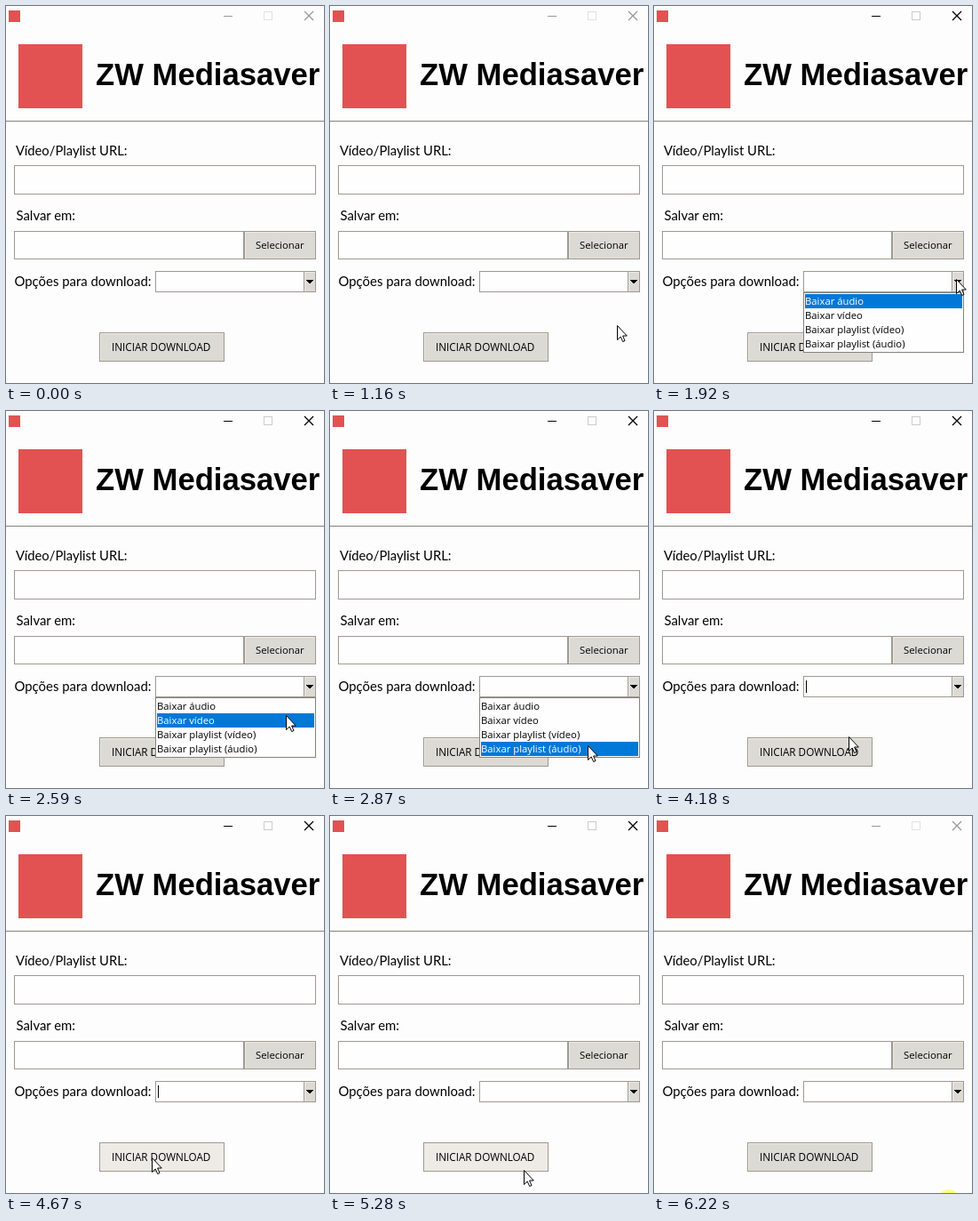
Recreate the animation shown at these times as an HTML page. Size 358 by 424 pixels, loop 6350 ms.

```html
<!DOCTYPE html>
<html lang="pt">
<head>
<meta charset="utf-8">
<title>ZW Mediasaver</title>
<style>
  html, body { margin: 0; width: 100%; height: 100%; overflow: hidden; background: #fdfdfd; }
  svg { display: block; }
  .label { font: 14.9px Lato, Carlito, sans-serif; }
  .ui { font: 500 11.3px "Open Sans", "Noto Sans", sans-serif; }
  .ui.caps { font-size: 11.7px; font-weight: 400; }
  .heading { font: bold 34.67px "Liberation Sans", Arial, sans-serif; }
  .field, .button { stroke: #9e9a91; fill: #fefefe; rx: 1px; }
  .button { fill: #dcdad5; }
  .shine { stroke: #eeebe7; fill: none; }
  .shapes { shape-rendering: crispEdges; }
</style>
</head>
<body>
<svg width="358" height="424" viewBox="0 0 358 424">
  <rect x="3" y="5" width="13" height="13" fill="#e25252"/>
  <g id="controls" fill="none">
    <path d="M245 11.5h10" class="shapes"/>
    <path d="M336 6l10 10m0-10l-10 10" stroke-width="1.3"/>
  </g>
  <rect id="maximize" x="290.5" y="6.5" width="9" height="9" fill="none"/>

  <rect x="14" y="43" width="72" height="72" fill="#e25252"/>
  <text class="heading" x="101" y="89">ZW Mediasaver</text>
  <path d="M0 129.5h358" stroke="#85827d" class="shapes"/>

  <text class="label" x="11" y="168" style="font-size:14.8px">Vídeo/Playlist URL:</text>
  <text class="label" x="11.5" y="241">Salvar em:</text>
  <text class="label" x="9.5" y="315">Opções para download:</text>

  <g class="shapes">
    <rect class="field" x="9.5" y="179.5" width="339" height="32"/>
    <rect class="field" x="9.5" y="253.5" width="258" height="31"/>
    <rect class="button" x="268.5" y="253.5" width="80" height="31"/>
    <path class="shine" d="M269.5 284V254.5H348"/>
    <rect class="field" x="168.5" y="298.5" width="180" height="23"/>
    <rect class="button" x="335.5" y="298.5" width="13" height="23"/>
    <path class="shine" d="M336.5 321V299.5H348"/>
    <rect class="button" id="start" x="105.5" y="367.5" width="140" height="32"/>
    <path class="shine" d="M106.5 399V368.5H245"/>
    <path id="caret" d="M171.5 303v14" stroke="#000"/>
    <path d="M337 308h9l-4.5 4.5z"/>
  </g>
  <text class="ui" x="281" y="273">Selecionar</text>
  <text class="ui caps" x="119" y="388">INICIAR DOWNLOAD</text>

  <g id="popup">
    <rect x="168.5" y="322.5" width="180" height="67" fill="#fefefe" stroke="#85827d" class="shapes"/>
    <rect id="highlight" x="170" width="177" height="16" fill="#0078d7"/>
    <g id="options" class="ui"></g>
  </g>

  <circle id="click" r="12" fill="#ff0" fill-opacity=".5"/>
  <path id="arrow" d="M.5.5V16.5L4.2 13L6.7 18.5L9 17.5L6.6 12H11.3Z" fill="#fff" stroke="#000"/>
  <path id="beam" d="M-3.5-8.5h3l.5.5l.5-.5h3M0-8V8M-3.5 8.5h3l.5-.5l.5.5h3" fill="none" stroke="#000"/>
</svg>
<script>
const LOOP = 6350, STEP = 70;
const $ = id => document.getElementById(id);
const set = (id, attrs) => {
  for (const key in attrs) $(id).setAttribute(key, attrs[key]);
};
const show = (id, on) => set(id, { visibility: on ? 'visible' : 'hidden' });
const inside = (p, x, y, w, h) => p.x >= x && p.x < x + w && p.y >= y && p.y < y + h;

$('options').innerHTML = ['áudio', 'vídeo', 'playlist (vídeo)', 'playlist (áudio)']
  .map((name, i) => `<text x="170" y="${336 + 16 * i}">Baixar ${name}</text>`).join('');

// Pointer moves: start time, number of steps, end x, end y
const moves = [
  [810, 8, 326, 332], [1370, 2, 334, 309], [1510, 3, 340, 307],
  [2380, 8, 290, 376], [3070, 3, 321, 327], [3280, 4, 338, 307],
  [3760, 7, 219, 366], [4250, 1, 212, 373], [4320, 5, 153, 383],
  [4670, 4, 196, 385], [5000, 5, 218, 398], [5350, 4, 274, 434]
];
// Clicks: start, end, x, y
const clicks = [[1850, 1920, 340, 307], [3640, 3760, 338, 307], [6220, LOOP, 332, 432]];

function pointer(t) {
  let x = 314, y = 440;
  for (const [start, steps, toX, toY] of moves) {
    if (t < start) break;
    const k = Math.min(1, (Math.floor((t - start) / STEP) + 1) / steps);
    x += (toX - x) * k;
    y += (toY - y) * k;
  }
  return { x: Math.round(x), y: Math.round(y) };
}

// The row nearest the pointer is selected once it has entered the list
function selectedRow(t, p) {
  if (t < 2380) return 0;
  return Math.max(0, Math.min(3, Math.floor((p.y - 324) / 16)));
}

function draw(t) {
  const p = pointer(t);
  const active = t >= 1850 && t < 6220;
  const open = t >= 1920 && t < 3760;
  const place = { transform: `translate(${p.x} ${p.y})` };

  set('controls', { stroke: active ? '#000' : '#999' });
  set('maximize', { stroke: active ? '#ccc' : '#e2e2e2' });
  set('start', { style: `fill:${!open && inside(p, 105, 367, 141, 33) ? '#eeebe7' : '#dcdad5'}` });
  show('caret', t >= 3760 && t < 6220 && (t - 3690) % 900 < 600);

  show('popup', open);
  const row = selectedRow(t, p);
  set('highlight', { y: 324 + 16 * row });
  [...$('options').children].forEach((o, i) => o.setAttribute('fill', i === row ? '#fff' : '#000'));

  const click = clicks.find(([from, to]) => t >= from && t < to);
  show('click', click);
  if (click) set('click', { cx: click[2], cy: click[3] });

  const beam = !open && inside(p, 168, 298, 167, 24);
  set('arrow', place);
  set('beam', place);
  show('arrow', !beam);
  show('beam', beam);
}

const origin = performance.now();
function tick() {
  draw((performance.now() - origin) % LOOP);
  requestAnimationFrame(tick);
}
tick();
</script>
</body>
</html>
```
